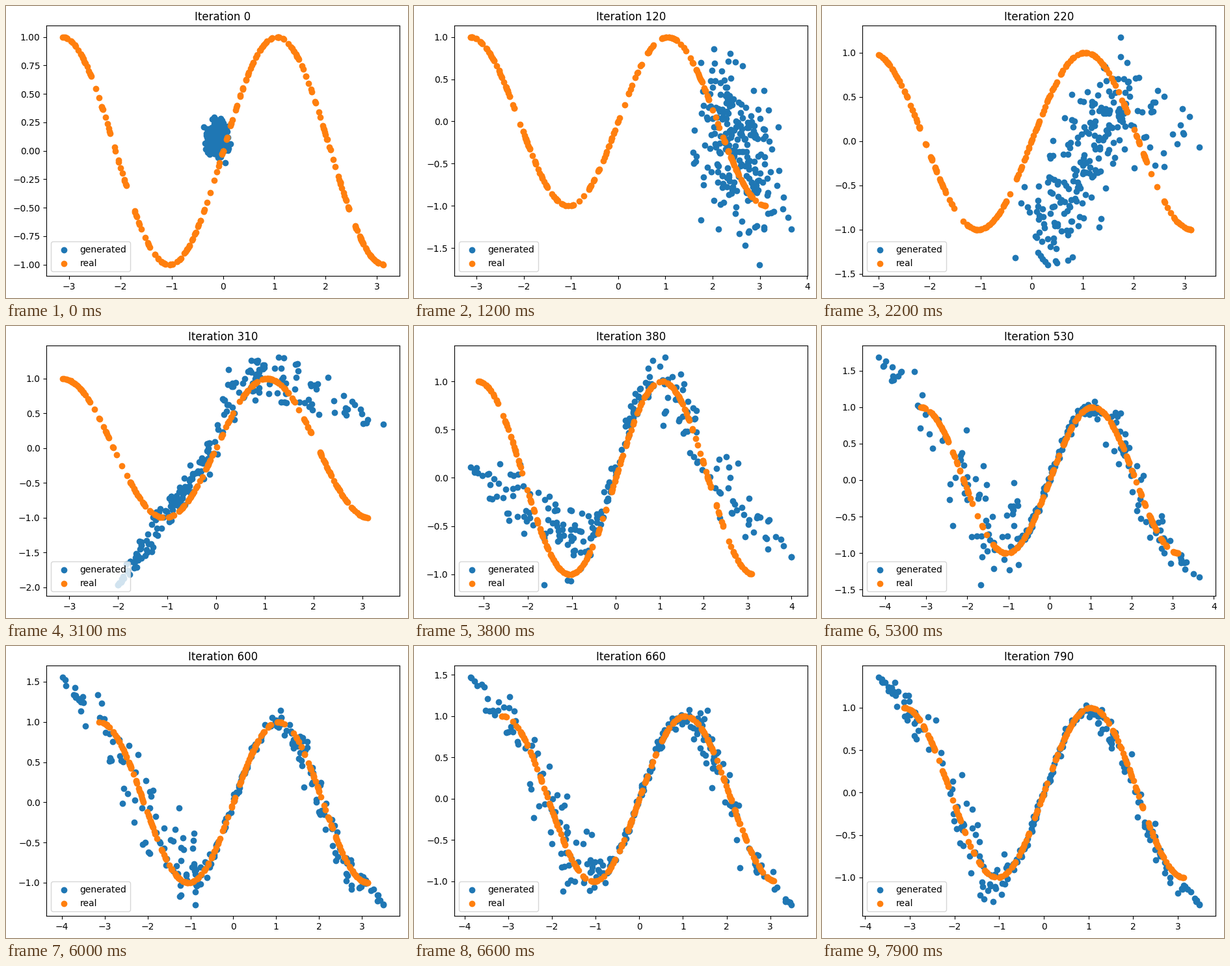
A matplotlib script that plays this animation: 618 px wide and 449 px high, repeating every 8 s.

```python
import numpy as np
import matplotlib.pyplot as plt
from matplotlib.animation import FuncAnimation

W, H, DPI = 618, 449, 100
FRAMES, N = 80, 230
BLOB, ARC, WAVE = 12, 31, 44  # steps at which each shape is complete


def phase(k, start, end):
    return np.clip((k - start) / (end - start), 0, 1)


def mix(a, b, t):
    return a + (b - a) * t


def sigmoid(x):
    return 1 / (1 + np.exp(-x))


def stretch(z, left, right, core):
    """Map z in [-1, 1] to x: even in the core, sparse towards the tips."""
    tip = np.where(z < 0, left, right)
    return z * (core + (tip - core) * z**4)


def blob(noise, k):
    """A small cluster that drifts right and swells."""
    g = phase(k, 0, BLOB) ** 2
    nx, ny = noise
    x = mix(-.11, 2.5, g) + mix(.1, .42, g) * nx
    y = mix(.11, -.32, g) + mix(.075, .47, g) * ny - .15 * g * nx
    return np.array([x, y])


def arc(z, noise):
    """A straight left arm joined to a hump that fades to the right."""
    x = stretch(z, 2, 3.43, 1.8)
    y = np.where(x < 0, x, x * np.exp(1 - x)) + .04
    return np.array([x, y]) + noise * (.08 + .1 * np.clip(x, 0, 1.5))


def wave(z, noise, k):
    """The sine with straight tails; its scatter shrinks as training goes on."""
    q = phase(k, WAVE, FRAMES - 1)
    x = stretch(z, 3.7 + .72 * (1 - q)**1.5, 3.48 + (1 - q)**6, 3)
    inner = np.clip(x, -np.pi, np.pi)
    on_left, on_right = sigmoid(-12 * (x + .8)), sigmoid(8 * (x - 1.1))
    y = np.sin(1.5 * inner) * (1 - .25 * (1 - q) * on_left * (x > -3))
    y += .65 * (inner - x) + .06 * (1 - q)**3 - .1 * q * on_right
    spread = .03 + mix(.32, .15, q) * on_left + mix(.14, .06, q) * on_right
    return np.array([x, y]) + noise * spread * np.array([[.7], [1]])


def sample(k):
    rng = np.random.default_rng(k)
    xr = rng.uniform(-np.pi, np.pi, N)
    real = np.column_stack([xr, np.sin(1.5 * xr)])

    z = rng.uniform(-1, 1, N)
    z[:2] = -1, 1
    noise = rng.uniform(-1, 1, (3, 2, N)).sum(axis=0)
    calm = noise * (1 - z**8)
    gen = mix(blob(noise, k), arc(z, calm), phase(k, BLOB, ARC))
    gen = mix(gen, wave(z, calm, k), phase(k, ARC, WAVE))
    return gen.T, real


fig = plt.figure(figsize=(W / DPI, H / DPI), dpi=DPI, facecolor="white")
ax = fig.add_axes([62.3 / W, 33.9 / H, 542.5 / W, 385 / H])
fake_dots = ax.scatter([], [], label="generated")
real_dots = ax.scatter([], [], label="real")
ax.legend(loc="lower left")
title = ax.set_title("Iteration 0")


def update(k):
    gen, real = sample(k)
    fake_dots.set_offsets(gen)
    real_dots.set_offsets(real)
    dots = np.vstack([gen, real])
    lo, hi = dots.min(axis=0), dots.max(axis=0)
    pad = .05 * (hi - lo)
    ax.set_xlim(lo[0] - pad[0], hi[0] + pad[0])
    ax.set_ylim(lo[1] - pad[1], hi[1] + pad[1])
    title.set_text(f"Iteration {10 * k}")
    return fake_dots, real_dots, title


anim = FuncAnimation(fig, update, frames=FRAMES, interval=100,
                     init_func=lambda: update(0), repeat=True, repeat_delay=0)
plt.show()
```
